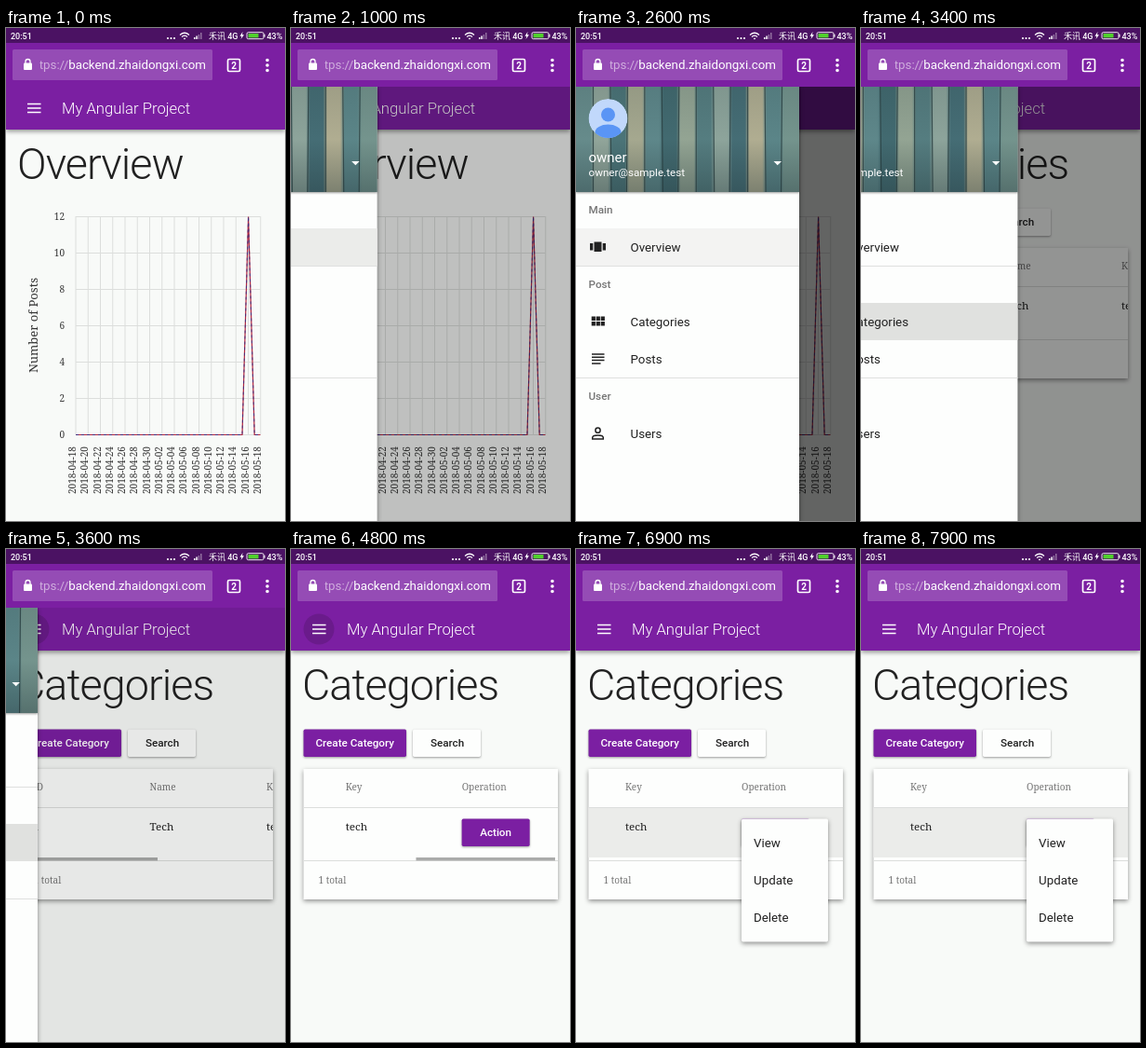
An HTML page that plays this animation: 300 by 529 pixels, repeating every 8000 ms.

```html
<!DOCTYPE html>
<html lang="en">
<head>
<meta charset="utf-8">
<title>Project overview</title>
<style>
  html, body { margin: 0; height: 100%; overflow: hidden; background: #f8faf8; }
  svg { display: block; width: 100%; height: 100%; font-family: Roboto, sans-serif; }
  .serif { font-family: "Noto Serif", serif; font-size: 10px; fill: #333; }
  .title { font-size: 46.67px; font-weight: 300; letter-spacing: -.02em; fill: #212121; }
  .btn { font-size: 11.67px; font-weight: 500; }
  .item { font-size: 13.33px; fill: #212121; }
  .group { font-size: 11.67px; font-weight: 500; fill: #757575; }
  .status { font-size: 9px; font-weight: 500; }
  .serif .grey, .grey { fill: #757575; }
  .cell { font-size: 11.67px; fill: #212121; }
  .low { filter: drop-shadow(0 1px 1.2px rgba(0,0,0,.38)); }
  .mid { filter: drop-shadow(0 2px 2.5px rgba(0,0,0,.42)); }
</style>
</head>
<body>
<svg viewBox="0 0 300 529" preserveAspectRatio="none">
  <defs>
    <linearGradient id="wood"></linearGradient>
    <linearGradient id="shade" x2="0" y2="1">
      <stop stop-color="#1d2f33" stop-opacity=".12"/>
      <stop offset=".5" stop-color="#1d2f33" stop-opacity="0"/>
      <stop offset="1" stop-color="#1d2f33" stop-opacity=".35"/>
    </linearGradient>
    <clipPath id="cardClip"><rect x="13.5" y="236" width="273.5" height="140"/></clipPath>
    <clipPath id="urlClip"><rect x="36.5" y="23" width="185" height="33"/></clipPath>
    <clipPath id="face"><circle cx="34.5" cy="97" r="21"/></clipPath>
  </defs>
  <rect width="300" height="529" fill="#f8faf8"/>

  <g id="overview">
    <text class="title" x="12" y="162">Overview</text>
    <path id="grid" fill="none" stroke="#dcdedc"/>
    <g id="labels" class="serif"></g>
    <text class="serif" style="font-size:13px" text-anchor="middle" transform="translate(34 319) rotate(-90)">Number of Posts</text>
    <path class="line" fill="none" stroke="#b3263f" stroke-width="1.2"/>
    <path class="line" fill="none" stroke="#27308c" stroke-width=".8" stroke-dasharray="3 3"/>
  </g>

  <g id="categories">
    <text class="title" x="12" y="162">Categories</text>
    <g class="btn">
      <rect class="low" x="13.5" y="193.5" width="110.5" height="29.5" rx="1.7" fill="#7b1fa2"/>
      <text x="26.5" y="212" fill="#fff">Create Category</text>
      <rect class="low" x="131" y="193.5" width="73" height="29.5" rx="1.7" fill="#fdfefd"/>
      <text x="150" y="212" fill="#212121">Search</text>
    </g>
    <rect class="mid" x="13.5" y="236" width="273.5" height="140" fill="#fdfefd"/>
    <rect id="hover" x="13.5" y="277.5" width="273.5" height="53.5" fill="#ebecea"/>
    <path d="M13.5 277.5H287M13.5 334.5H287" stroke="#dcdedc"/>
    <g clip-path="url(#cardClip)">
      <g id="cells">
        <g class="serif">
          <text class="grey" x="29" y="259">ID</text>
          <text class="grey" x="154.5" y="259">Name</text>
          <text class="grey" x="280" y="259">Key</text>
          <text class="grey" x="405" y="259">Operation</text>
          <text class="cell" x="29" y="301.5">1</text>
          <text class="cell" x="154.5" y="301.5">Tech</text>
          <text class="cell" x="280" y="301.5">tech</text>
        </g>
        <rect class="low" x="405" y="289.5" width="73" height="29.5" rx="1.7" fill="#7b1fa2"/>
        <rect id="press" x="405" y="289.5" width="73" height="29.5" rx="1.7" fill="#fff"/>
        <text class="btn" x="424.5" y="308" fill="#fff">Action</text>
      </g>
      <rect id="thumb" x="13.5" y="331" width="149.5" height="3.3"/>
    </g>
    <text class="serif grey" x="29.5" y="358.5">1 total</text>
    <g id="menu">
      <rect class="mid" x="178" y="289.5" width="93" height="132" rx="1.7" fill="#fdfefd"/>
      <g class="item">
        <text x="191" y="320">View</text>
        <text x="191" y="360">Update</text>
        <text x="191" y="399.5">Delete</text>
      </g>
    </g>
  </g>

  <g id="toolbar">
    <rect class="mid" y="55" width="300" height="54" fill="#7b1fa2"/>
    <circle id="focus" cx="30" cy="86" r="16.5"/>
    <path d="M23 81.5H37.5M23 86H37.5M23 90.5H37.5" stroke="#fff" stroke-width="1.7"/>
    <text x="60" y="92" font-size="16.67" font-weight="300" fill="#fff">My Angular Project</text>
  </g>

  <rect id="backdrop" y="63" width="300" height="466"/>

  <g id="drawer">
    <rect class="mid" y="63" width="240" height="466" fill="#fdfefd"/>
    <rect id="selOverview" y="215" width="240" height="40" fill="#ebecea"/>
    <rect id="selCategories" y="295" width="240" height="40" fill="#e0e1df"/>
    <path d="M0 255.5H240M0 375.5H240" stroke="#dfe0df"/>
    <rect class="low" y="63" width="240" height="113" fill="url(#wood)"/>
    <path id="gaps" stroke="#24383a" stroke-width="1.2" opacity=".75"/>
    <rect y="63" width="240" height="113" fill="url(#shade)"/>
    <g clip-path="url(#face)">
      <circle cx="34.5" cy="97" r="21" fill="#c1d8fb"/>
      <circle cx="34.5" cy="93" r="7.5" fill="#5a95f5"/>
      <ellipse cx="34.5" cy="112" rx="14" ry="8.5" fill="#5a95f5"/>
    </g>
    <g fill="#fff">
      <text x="13.5" y="143.5" font-size="15">owner</text>
      <text x="13.5" y="158.5" font-size="11.67">owner@sample.test</text>
      <path d="M212.5 143H221L216.7 147.3Z"/>
    </g>
    <g class="group">
      <text x="13.5" y="198.5">Main</text>
      <text x="13.5" y="278.5">Post</text>
      <text x="13.5" y="398.5">User</text>
    </g>
    <g class="item">
      <text x="58.5" y="240">Overview</text>
      <text x="58.5" y="320">Categories</text>
      <text x="58.5" y="360">Posts</text>
      <text x="58.5" y="440">Users</text>
      <path d="M15 231h3.3v7.5H15zM19.5 229.5h8V240h-8zM28.7 231H32v7.5h-3.3z"/>
    </g>
    <g fill="none" stroke="#212121" stroke-width="1.5">
      <path d="M16.7 311.8H31M16.7 317.3H31" stroke-width="4.6" stroke-dasharray="4.2 .8"/>
      <path d="M17 350H30.5M17 353.3H30.5M17 356.6H30.5M17 360H26.5"/>
      <circle cx="23.5" cy="431.7" r="2.6"/>
      <path d="M17.7 441V439.5C17.7 436 29.3 436 29.3 439.5V441Z"/>
    </g>
  </g>

  <g id="browser" fill="#fff">
    <rect y="16" width="300" height="47" fill="#7b1fa2"/>
    <rect width="300" height="16" fill="#4b1263"/>
    <g class="status">
      <text x="5" y="11.7">20:51</text>
      <text x="218" y="11.7" style="font-family:Roboto,'Noto Sans CJK SC','Noto Sans CJK',sans-serif">禾讯 4G</text>
      <text x="280.5" y="11.7">43%</text>
    </g>
    <path d="M174 11h8" stroke="#fff" stroke-width="2.2" stroke-linecap="round" stroke-dasharray="0 3.5"/>
    <g fill="none" stroke="#fff" stroke-width="1.2">
      <path d="M187 7.5Q192 3 197 7.5M189 9.5Q192 6.8 195 9.5"/>
      <rect x="259" y="4.7" width="18" height="7" rx="1.5" stroke-width=".9"/>
    </g>
    <path d="M190.5 10.7h3L192 12.5zM202 12v-2h1.5v2zm2.3 0V8.5h1.5V12zM254.5 4l-3 4.7h1.9L252.5 12l3.5-4.7h-2z"/>
    <path d="M206.6 12V7h1.5v5zm2.4 0V5h1.5v7z" opacity=".4"/>
    <rect x="260.5" y="6" width="11" height="4.4" fill="#4fd02c"/>
    <rect x="277.3" y="6.7" width="1.2" height="3"/>

    <rect x="7" y="23" width="215" height="33" rx="1.5" opacity=".2"/>
    <rect x="19" y="37.5" width="9" height="7.5" rx="1"/>
    <path d="M21 38V36Q21 33.5 23.5 33.5T26 36V38" fill="none" stroke="#fff" stroke-width="1.3"/>
    <g clip-path="url(#urlClip)">
      <text x="215" y="44" font-size="13.33" text-anchor="end"><tspan fill="#d0aede">tps://</tspan>backend.zhaidongxi.com</text>
    </g>
    <rect x="238.5" y="33.5" width="13" height="13" rx="1.5" fill="none" stroke="#fff" stroke-width="1.7"/>
    <text x="245" y="43.6" font-size="10" font-weight="700" text-anchor="middle">2</text>
    <path d="M281 34.5v12" stroke="#fff" stroke-width="3.6" stroke-linecap="round" stroke-dasharray="0 5.5"/>
  </g>
</svg>
<script>
const LOOP = 8000, SLIDE = 718, WIDTH = 240, SCROLL = 227;
const $ = id => document.getElementById(id);
const clamp = v => Math.min(1, Math.max(0, v));
const ramp = (t, start, length) => clamp((t - start) / length);
const fade = (id, v) => $(id).setAttribute('opacity', v);
const move = (id, v) => $(id).setAttribute('transform', v);

// cubic-bezier(.25, .8, .25, 1)
function ease(x) {
  if (x <= 0 || x >= 1) return clamp(x);
  let lo = 0, hi = 1, s;
  for (let i = 0; i < 24; i++) {
    s = (lo + hi) / 2;
    const at = .75 * s * (1 - s) + s ** 3;
    if (at < x) lo = s; else hi = s;
  }
  return 2.4 * s * (1 - s) ** 2 + 3 * s * s * (1 - s) + s ** 3;
}

function buildChart() {
  let grid = '', labels = '';
  for (let i = 0; i < 16; i++) {
    const x = 75 + i * 13.25;
    const day = new Date(Date.UTC(2018, 3, 18 + i * 2)).toISOString().slice(0, 10);
    grid += `M${x} 202V436`;
    labels += `<text transform="translate(${x} 500) rotate(-90)">${day}</text>`;
  }
  for (let n = 0; n <= 12; n += 2) {
    const y = 436.5 - n * 19.5;
    grid += `M75 ${y}H273.5`;
    labels += `<text x="63" y="${y + 3.5}" text-anchor="end">${n}</text>`;
  }
  $('grid').setAttribute('d', grid);
  $('labels').innerHTML = labels;
  for (const line of document.querySelectorAll('.line'))
    line.setAttribute('d', 'M75 436.5H254L260.6 202.5L267.2 436.5H273.5');
}

function buildWood() {
  const tones = ['#668b8b', '#91a59a', '#4b7478', '#a5a88f', '#5e878a', '#426a70',
    '#93a493', '#557d80', '#8da49b', '#456d75', '#b0ad91', '#5b8588', '#74948d'];
  const step = WIDTH / tones.length;
  let gaps = '';
  $('wood').innerHTML = tones.map((c, i) => {
    if (i) gaps += `M${i * step} 63l${i % 3 - 1} 113`;
    return [i + .1, i + .85].map(p =>
      `<stop offset="${p / tones.length}" stop-color="${c}"/>`).join('');
  }).join('');
  $('gaps').setAttribute('d', gaps);
}

function draw(t) {
  const open = ease(ramp(t, 915, SLIDE)) - ease(ramp(t, 3335, SLIDE));
  move('drawer', `translate(${(open - 1) * WIDTH - (open > 0 ? 0 : 10)} 0)`);
  fade('backdrop', .6 * open);

  const second = t >= 3300;
  $('overview').style.display = second ? 'none' : '';
  $('categories').style.display = second ? '' : 'none';
  fade('selOverview', 1 - ramp(t, 2530, 160));
  fade('selCategories', ramp(t, 2750, 250));

  $('focus').setAttribute('r', 16.5 * ease(ramp(t, 750, 200)));
  fade('focus', .14 * (1 - ramp(t, 6400, 150)));

  const shift = SCROLL * ease(ramp(t, 4350, 700));
  move('cells', `translate(${-shift} 0)`);
  move('thumb', `translate(${shift * 273.5 / 500.5} 0)`);
  fade('thumb', .33 * (1 - ramp(t, 5080, 250)));

  fade('press', .15 * ramp(t, 6250, 200));
  fade('hover', ramp(t, 6400, 100));
  const grow = ease(ramp(t, 6500, 250));
  fade('menu', grow);
  move('menu', `translate(178 289.5) scale(${.4 + .6 * grow}) translate(-178 -289.5)`);
}

buildChart();
buildWood();
const begin = performance.now();
function tick() {
  draw((performance.now() - begin) % LOOP);
  requestAnimationFrame(tick);
}
tick();
</script>
</body>
</html>
```
